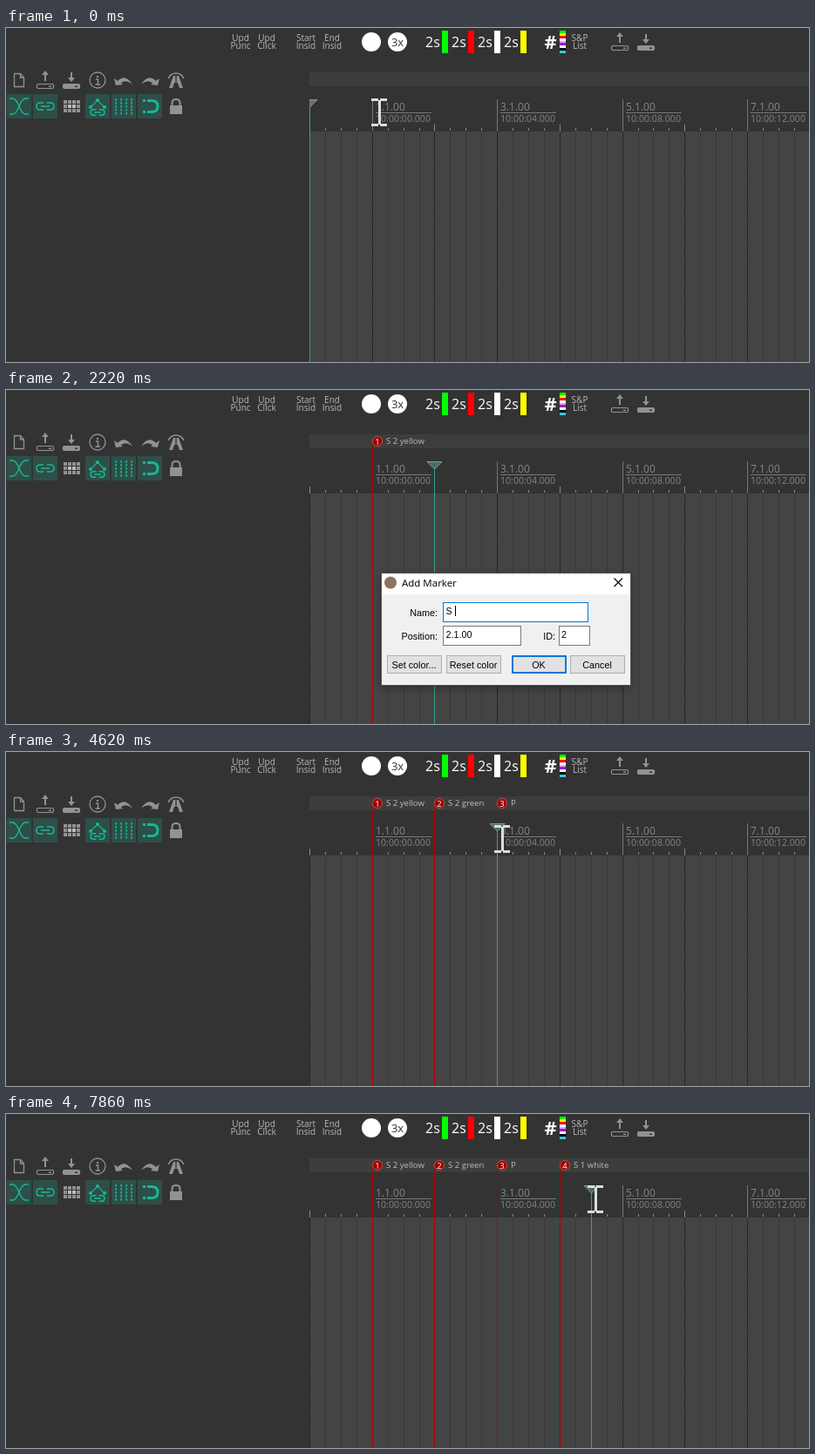
An HTML page with a canvas that plays this animation: 921 px wide and 384 px high, repeating every 8 s.

```html
<!DOCTYPE html>
<html lang="en">
<head>
<meta charset="utf-8">
<title>Adding markers</title>
<style>
html, body { margin: 0; width: 921px; height: 384px; overflow: hidden; background: #333; }
canvas { display: block; }
</style>
</head>
<body>
<canvas id="stage" width="921" height="384"></canvas>
<script>
const LOOP = 8000;
const UI = '"Open Sans", sans-serif';
const FORM = '"Liberation Sans", Arial, sans-serif';
const GREY = '#8f9492', TEAL = '#18b795';
const LEFT = 348, BAR = 71.72;

const stage = document.getElementById('stage').getContext('2d');
const panel = document.createElement('canvas');
panel.width = 287;
panel.height = 130;
let c = stage;

const barX = n => Math.round(LEFT + n * BAR);

function rect(x, y, w, h, color) {
  c.fillStyle = color;
  c.fillRect(x, y, w, h);
}

function box(x, y, w, h, fill, edge, width = 1) {
  rect(x, y, w, h, edge);
  rect(x + width, y + width, w - 2 * width, h - 2 * width, fill);
}

function text(str, x, y, font, color, align = 'left') {
  c.font = font;
  c.fillStyle = color;
  c.textAlign = align;
  c.fillText(str, x, y);
}

function path(d, color, width = 1.5, fill) {
  const p = new Path2D(d);
  if (fill) { c.fillStyle = fill; c.fill(p); }
  if (color) { c.strokeStyle = color; c.lineWidth = width; c.stroke(p); }
}

function disc(x, y, r, fill, edge, width = 1) {
  c.beginPath();
  c.arc(x, y, r, 0, 7);
  if (fill) { c.fillStyle = fill; c.fill(); }
  if (edge) { c.strokeStyle = edge; c.lineWidth = width; c.stroke(); }
}

function at(x, y, draw) {
  c.save();
  c.translate(x, y);
  draw();
  c.restore();
}

// Icons, each centred on the origin
function tray(up) {
  path('M0-9V1', GREY, 2);
  path(up ? 'M-4-6L0-11L4-6Z' : 'M-4-3L0 2L4-3Z', null, 0, GREY);
  path('M-8 4.5H8Q9.5 4.5 9.5 6V8Q9.5 9.5 8 9.5H-8Q-9.5 9.5-9.5 8V6Q-9.5 4.5-8 4.5Z', GREY, 1.2, up ? null : GREY);
  rect(4, 6.5, 3, 1.5, up ? GREY : '#333');
}

function undo() {
  path('M-7 1Q2-8 10 5Q2-2-4 4Z', null, 0, GREY);
  path('M-11-2L-9 6L-1 5Z', null, 0, GREY);
}

function link(y = 0, k = 1) {
  c.save();
  c.translate(0, y);
  c.scale(k, k);
  path('M-2-4H-6Q-10-4-10 0Q-10 4-6 4H-2M2-4H6Q10-4 10 0Q10 4 6 4H2M-5 0H5', TEAL, 1.5 / k);
  c.restore();
}

const topIcons = [
  () => path('M-5.5-7.5H1.5L5.5-3V7.5H-5.5ZM1.5-7.5V-3H5.5', GREY, 1.3),
  () => tray(true),
  () => tray(false),
  () => {
    disc(0, 0, 9, null, GREY, 1.3);
    rect(-1, -5, 2, 2, GREY);
    path('M-2-1H.5V4.5M-2.5 5H3', GREY, 1.4);
  },
  undo,
  () => { c.scale(-1, 1); undo(); },
  () => {
    path('M-3-5H3L8 9H4L2 3H-2L-4 9H-8Z', null, 0, GREY);
    path('M-9-2Q-6-8 0-8Q6-8 9-2', GREY, 1.5);
    path('M0-5V8', '#333', 1.3);
  }
];

const lowIcons = [
  () => path('M-11-9H-7Q-3-8 0 0Q3 8 7 9H11M11-9H7Q3-8 0 0Q-3 8-7 9H-11', TEAL, 1.3),
  () => link(),
  () => {
    for (let i = 0; i < 12; i++)
      rect(-9 + (i % 4) * 5, -7 + (i >> 2) * 5, 4, 4, i === 5 || i === 6 ? '#bbb' : GREY);
  },
  () => {
    path('M-8 1L0-7L8 1', TEAL, 1.1);
    [[-8, 1], [0, -7], [8, 1]].forEach(p => disc(p[0], p[1], 2, TEAL));
    link(7, .8);
  },
  () => {
    for (let x = -9; x <= 9; x += 6)
      for (let y = -9; y < 9; y += 4) rect(x - .7, y, 1.6, 2.7, TEAL);
  },
  () => {
    path('M-3-6.5H2Q9-6.5 9 0Q9 6.5 2 6.5H-3', TEAL, 3);
    rect(-8, -8, 3, 3, TEAL);
    rect(-8, 5, 3, 3, TEAL);
  },
  () => {
    rect(-7, -1, 14, 10, GREY);
    path('M-4.5 0V-4Q-4.5-8 0-8Q4.5-8 4.5-4V0', GREY, 2);
  }
];

function drawToolbars() {
  [[269, 'Upd', 'Punc'], [299, 'Upd', 'Click'], [344, 'Start', 'Insid'],
   [374, 'End', 'Insid'], [658, 'S&P', 'List']].forEach(([x, a, b]) => {
    text(a, x, 15, '10px ' + UI, '#b8b8b8', 'center');
    text(b, x, 24, '10px ' + UI, '#b8b8b8', 'center');
  });
  disc(419, 16, 11, '#fff');
  disc(449, 16, 11, '#fff');
  text('3x', 449, 21, '13px ' + UI, '#333', 'center');
  ['#00ff00', '#ff0000', '#ffffff', '#ffff00'].forEach((color, i) => {
    text('2s', 481 + 30 * i, 22, '16px ' + UI, '#fff');
    rect(500 + 30 * i, 3, 7, 26, color);
  });
  text('#', 624.5, 24, 'bold 22px ' + UI, '#fff', 'center');
  ['#0f0', '#ff0', '#f00', '#fff', '#e9f', '#82c', '#fff', '#000', '#3cd'].forEach((color, i) =>
    rect(635, 3 + Math.round(i * 26 / 9), 7, 3, color));
  at(704, 16, () => tray(true));
  at(734, 16, () => tray(false));
  topIcons.forEach((icon, i) => at(15 + 30 * i, 60, icon));
  lowIcons.forEach((icon, i) => {
    if (i !== 2 && i !== 6) rect(1 + 30 * i, 76, 28, 28, '#2d4f48');
    at(15 + 30 * i, 90, icon);
  });
}

function drawTimeline() {
  rect(LEFT, 51, 573, 16, '#3c3e3d');
  rect(LEFT, 119, 573, 265, '#444');
  for (let i = 0; i < 32; i++) {
    const x = barX(i / 4);
    if (i % 4) {
      rect(x, 115, 1, 3, '#888');
      rect(x, 119, 1, 265, '#393939');
    } else {
      rect(x, 111, 1, 8, '#888');
      for (let y = 119; y < 384; y += 2) rect(x, y, 1, 1, '#0c0c0c');
    }
  }
  for (let n = 1; n < 8; n += 2) {
    const x = barX(n), sec = String(n * 2 - 2).padStart(2, '0');
    rect(x, 82, 1, 37, '#777');
    rect(x + 4, 97, 64, 1, '#777');
    text(n + '.1.00', x + 4, 95, '12px ' + UI, '#858585');
    text('10:00:' + sec + '.000', x + 4, 108, '10.6px ' + UI, '#858585');
  }
}

// keys: the times at which each character of the name is typed
const spread = (start, step, n) => Array.from({ length: n }, (_, i) => start + step * i);
const dialogs = [
  { open: 120, close: 870, name: 'S 2 yellow', keys: spread(330, 50, 10) },
  { open: 1800, close: 2850, name: 'S 2 green', keys: [2070, 2220, ...spread(2250, 60, 7)] },
  { open: 3930, close: 4350, name: 'P', keys: [4320] },
  { open: 6120, close: 7380, name: 'S 1 white', keys: spread(6420, 60, 9) }
];

function drawMarkers(t) {
  dialogs.forEach((d, i) => {
    if (t < d.close + 30) return;
    const x = barX(i + 1);
    rect(x, 64, 1, 320, '#b00000');
    disc(x + 6, 59, 5.5, '#970000', '#d04a4a');
    text(i + 1, x + 6, 62.5, '9.5px ' + UI, '#fff', 'center');
    text(d.name, x + 16, 62, '9.6px ' + UI, '#bcbcbc');
  });
}

const editSteps = [[0, LEFT], [60, barX(1)], [1440, barX(2)], [3540, barX(3)], [4980, barX(4)], [7770, barX(4.5)]];

function drawEditCursor(t) {
  const x = editSteps.filter(s => s[0] <= t).pop()[1];
  c.save();
  c.beginPath();
  c.rect(LEFT, 70, 573, 314);
  c.clip();
  rect(x, 90, 1, 294, '#35a18f');
  path(`M${x - 8} 82.5H${x + 9}L${x + .5} 91Z`, '#8b9694', 1, t < 1500 ? '#6d6d6d' : '#42706a');
  c.restore();
}

function button(label, x, main) {
  box(x, 95, 63, 21, '#e1e1e1', main ? '#0078d7' : '#adadad', main ? 2 : 1);
  text(label, x + 31, 110, '10.8px ' + FORM, '#000', 'center');
}

function paintPanel(d, id, t) {
  const font = '10.8px ' + FORM;
  c = panel.getContext('2d');
  box(0, 0, 287, 130, '#f0f0f0', '#555');
  rect(1, 1, 285, 24, '#fff');
  disc(11, 11.5, 7, '#8a7360');
  text('Add Marker', 24, 15.5, '11.5px ' + UI, '#000');
  path('M267.5 6.5L277 16M277 6.5L267.5 16', '#000', 1.1);
  text('Name:', 65, 50, font, '#000', 'right');
  text('Position:', 65, 77, font, '#000', 'right');
  text('ID:', 200, 77, font, '#000', 'right');
  box(71, 34, 167, 23, '#fff', '#0078d7');
  box(71, 61, 90, 23, '#fff', '#7a7a7a');
  box(204, 61, 36, 23, '#fff', '#7a7a7a');
  text(id + '.1.00', 74.5, 75, font, '#000');
  text(id, 207, 75, font, '#000');
  const typed = d.keys.filter(k => k <= t);
  const name = d.name.slice(0, typed.length);
  text(name, 74.5, 48, '10.5px ' + FORM, '#000');
  const last = typed.length ? typed[typed.length - 1] : d.open + 180;
  if (t < last + 300) rect(Math.round(75 + c.measureText(name).width), 38, 1, 12, '#000');
  button('Set color...', 7);
  button('Reset color', 75);
  button('OK', 150, true);
  button('Cancel', 217);
  c = stage;
}

function drawDialog(t) {
  const i = dialogs.findIndex(d => t >= d.open && t < d.close + 120);
  if (i < 0) return;
  const d = dialogs[i];
  const rise = 1 - Math.pow(1 - Math.min(1, (t - d.open + 30) / 180), 1.4);
  const fall = 1 - Math.max(0, t - d.close) / 120;
  const alpha = rise * fall;
  paintPanel(d, i + 1, t);
  at(555, 268, () => {
    c.scale(.955 + .045 * alpha, .955 + .045 * alpha);
    c.globalAlpha = alpha;
    c.shadowColor = 'rgba(0,0,0,.3)';
    c.shadowBlur = 9;
    c.shadowOffsetY = 3;
    c.drawImage(panel, -125, -58);
  });
}

const pointers = {
  beam() {
    [-16, 13].forEach(y => {
      rect(-9, y, 8, 3, '#ddd');
      rect(1, y, 8, 3, '#ddd');
    });
    rect(-1, -14, 3, 28, '#ddd');
  },
  arrow() {
    path('M0 0V33L7.5 26.5L13 38L18.5 35.5L13.5 24H23.5Z', '#222', 1, '#fff');
  },
  busy() {
    disc(0, 0, 16, null, '#2b95f2', 7);
    c.beginPath();
    c.arc(0, 0, 16, 2.7, 4);
    c.strokeStyle = '#2cc0ff';
    c.stroke();
  },
  none() {}
};

// time, x, y, shape from that time on
const mouse = [
  [0, 428, 97, 'beam'], [120, 428, 97, 'none'],
  [1020, 430, 98, 'beam'], [1230, 484, 109, 'beam'], [1380, 492, 92, 'beam'],
  [1830, 492, 92, 'arrow'], [2010, 492, 92, 'none'],
  [3090, 493, 95, 'beam'], [3330, 567, 97, 'beam'], [3540, 567, 97, 'beam'], [3660, 553, 98, 'beam'],
  [3930, 553, 98, 'arrow'], [4320, 553, 98, 'none'],
  [4590, 556, 98, 'beam'], [4770, 635, 108, 'beam'], [4980, 635, 108, 'beam'], [5070, 614, 106, 'beam'],
  [6090, 614, 106, 'busy'], [6180, 614, 106, 'arrow'], [6420, 614, 106, 'none'],
  [7140, 614, 106, 'arrow'], [7260, 708, 198, 'arrow'], [7350, 733, 186, 'arrow'],
  [7440, 722, 150, 'beam'], [7650, 676, 98, 'beam'], [LOOP, 676, 98, 'beam']
];

function drawMouse(t) {
  const i = mouse.findIndex(m => m[0] > t);
  const a = mouse[i - 1], b = mouse[i];
  const p = (t - a[0]) / (b[0] - a[0]);
  at(Math.round(a[1] + (b[1] - a[1]) * p), Math.round(a[2] + (b[2] - a[2]) * p), pointers[a[3]]);
}

const start = performance.now();

function frame() {
  // The picture advances in 30 ms steps
  const t = Math.floor(((performance.now() - start) % LOOP) / 30) * 30;
  rect(0, 0, 921, 384, '#333');
  drawToolbars();
  drawTimeline();
  drawMarkers(t);
  drawEditCursor(t);
  drawDialog(t);
  drawMouse(t);
  requestAnimationFrame(frame);
}

frame();
</script>
</body>
</html>
```
